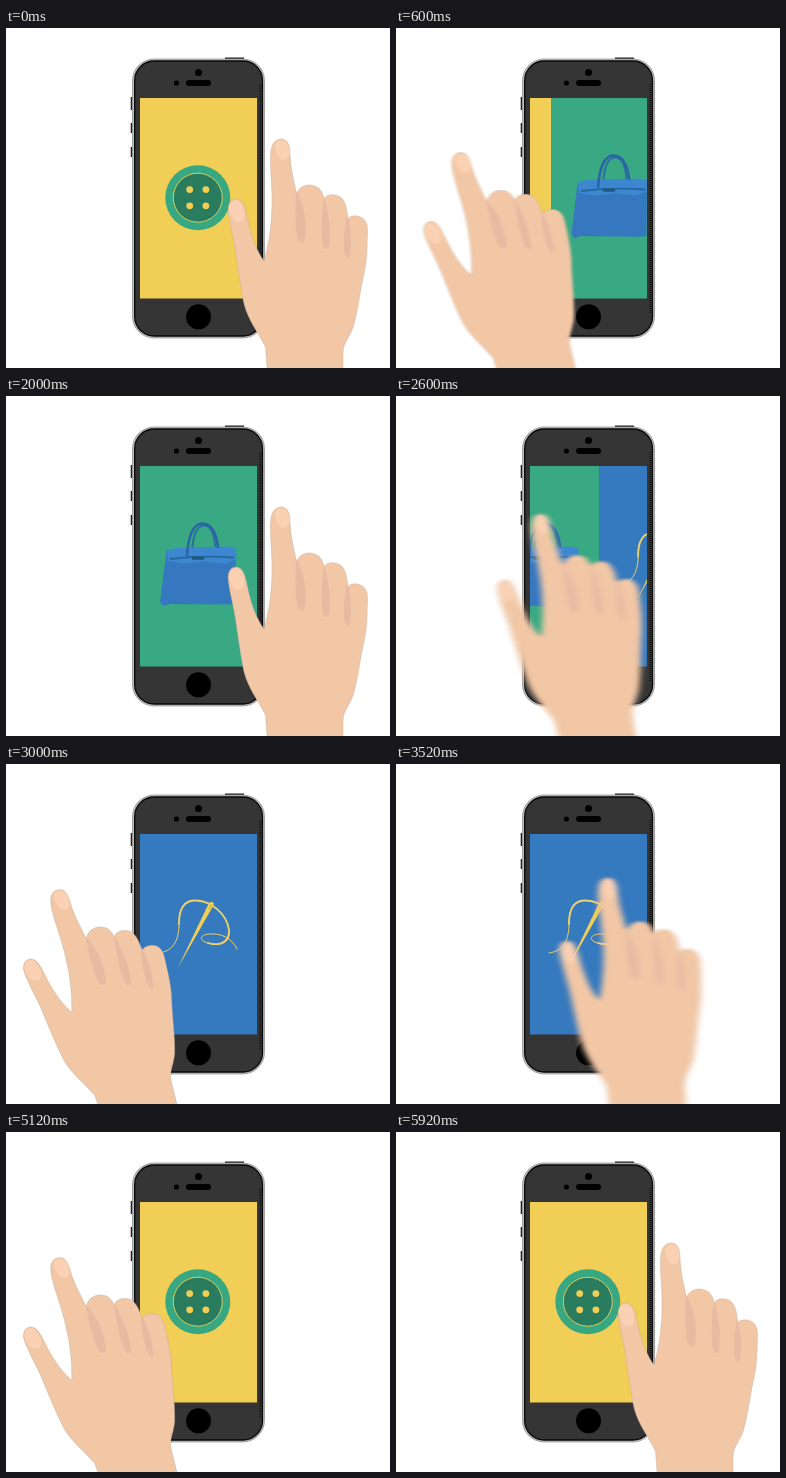
These frames come from a looping animation (384x340 px, 5960 ms). An HTML page:

```html
<!DOCTYPE html>
<html lang="en">
<head>
<meta charset="utf-8">
<title>Swipe</title>
<style>
html, body { margin: 0; width: 100%; height: 100%; overflow: hidden; background: #fff; }
svg { display: block; width: 384px; height: 340px; }
</style>
</head>
<body>
<svg viewBox="0 0 384 340" xmlns="http://www.w3.org/2000/svg">
  <defs>
    <clipPath id="screen"><rect x="134" y="70" width="117" height="200.5"/></clipPath>
    <filter id="blur" filterUnits="userSpaceOnUse" x="-30" y="0" width="450" height="420" color-interpolation-filters="sRGB">
      <feGaussianBlur id="blurAmount" stdDeviation="0 0"/>
    </filter>
  </defs>

  <!-- phone -->
  <g>
    <path d="M219 30.2H238M125.5 69V82M125.5 95V105M125.5 119V129" stroke="#222" stroke-width="1.6" fill="none"/>
    <rect x="126.5" y="31" width="132" height="279" rx="21.5" fill="#bcbcbc" stroke="#8c8c8c" stroke-width=".7"/>
    <rect x="128.7" y="33" width="127.8" height="275" rx="19.5" fill="#353535" stroke="#080808" stroke-width="1.3"/>
    <path d="M254.3 56V286" stroke="#151515" stroke-width="2" stroke-dasharray="1 1"/>
    <circle cx="192.5" cy="44.5" r="3.5"/>
    <circle cx="170.5" cy="55" r="2.6"/>
    <rect x="180" y="52" width="25" height="6" rx="3"/>
    <circle cx="192.5" cy="288.8" r="12.5"/>
  </g>

  <!-- pages -->
  <g clip-path="url(#screen)">
    <g class="page">
      <rect x="134" y="70" width="117.5" height="201" fill="#f1ce56"/>
      <circle cx="191.8" cy="169.7" r="32.5" fill="#37a881"/>
      <circle cx="191.8" cy="169.7" r="24.5" fill="#2a7c5e" stroke="#d8cc62" stroke-width="1"/>
      <g fill="#f1ce56">
        <circle cx="183.7" cy="161.6" r="3.4"/><circle cx="199.9" cy="161.6" r="3.4"/>
        <circle cx="183.7" cy="177.8" r="3.4"/><circle cx="199.9" cy="177.8" r="3.4"/>
      </g>
    </g>
    <g class="page">
      <rect x="134" y="70" width="117.5" height="201" fill="#38a983"/>
      <path d="M186 156C187 140 191 129.500 198 129.500C206 129.500 209 141 209.500 154" fill="none" stroke="#2b6f9e" stroke-width="2"/>
      <path id="bag" fill="#3578c0"/>
      <path d="M161 154L170 152L222 150.500L230 152.500L230.500 163L219 167.500L198 165.500L177 167.500L162 165Z" fill="#3c87d0"/>
      <path d="M164 163Q196 159 228 161.500" fill="none" stroke="#24679f" stroke-width="1.8"/>
      <path d="M186 162H198" stroke="#205a80" stroke-width="3.5"/>
      <path d="M181 160C182 141 187 127.500 196.500 127.500C206 127.500 211 139 212 152" fill="none" stroke="#2a66a6" stroke-width="2.6"/>
    </g>
    <g class="page">
      <rect x="134" y="70" width="117.5" height="201" fill="#3579bf"/>
      <g fill="none" stroke="#edd069" stroke-linecap="round">
        <path d="M153 189C168 187 172 176 173 163C172 145 178 137 188 136.500C205 136 221 150 223 166C225 180 212 183 202 179C193 177 193 171 203 170C215 169 226 174 231 185" stroke-width="1"/>
        <path d="M173 160C173 145 178 137 188 136.500C205 136 221 150 223 166C224 179 212 182 202 179" stroke-width="1.8"/>
      </g>
      <path d="M171.500 204.500L202.500 140Q205 136 208 139.500L206 144Z" fill="#f1ce56"/>
      <path d="M205.500 140.500L203 145.500" stroke="#b9a95f" stroke-width="1"/>
    </g>
  </g>

  <g filter="url(#blur)">
    <g id="hand">
      <path d="M262 410L261 340L259.500 319C252 304 242 292 238 276C234 256 232 240 229 220C226 204 223 193 222 182C222 174 226 171 230 171C235 171 238 175 240 184C244 203 248 219 258 233C263 216 266 196 266 172C266 154 264 141 264.500 127C265 116 269 111 275 111C281 111 284 116 284 126C284.500 141 288 152 290.500 166C293 159 298 157 304 157C313 158 317 163 318 171C320 167 325 166 329 167C337 168 341 175 341.500 191C344 188 347 187.500 351 188C358 189 362 194 361.500 204C361 222 361 234 357 250C353 270 352 282 347.500 298C344 309 337 315 337 325L336.500 410Z" fill="#f2c7a5" stroke="#b9a598" stroke-opacity=".45" stroke-width=".8"/>
      <g fill="#e7baa2">
        <path d="M290.500 163C288.500 180 289 204 292 212Q295 217 299 212C301 196 300 182 290.500 163Z"/>
        <path d="M318 169C315.500 184 315 208 317 218Q320 224 323 219C325 201 323 186 318 169Z"/>
        <path d="M341.300 187C338 201 337 217 339 227Q342 233 344 227C345.500 211 345 199 341.300 187Z"/>
      </g>
      <g fill="#fbd1b3">
        <path d="M269 118Q271 112 276 112Q283 113 283.500 124Q283 132 277 132Q271 131 269 118Z"/>
        <path d="M223 180Q225 172 230 172Q236 173 238 184Q239 194 232 194Q225 193 223 180Z"/>
      </g>
    </g>
  </g>
</svg>
<script>
const LOOP = 5960, STEP = 40, WIDTH = 117;
const STARTS = [0, 2120, 4240];
const SWIPE = [258, 658], BACK = [1143, 1543], SLIDE = [290, 720];
const PIVOT = [298, 335], TRAVEL = -168, DROP = 2, TILT = -14.5;

const $ = id => document.getElementById(id);
const hand = $('hand'), blur = $('blurAmount'), bag = $('bag');
const pages = [...document.querySelectorAll('.page')];

function ease(t, [from, to]) {
  const p = Math.min(1, Math.max(0, (t - from) / (to - from)));
  return (1 - Math.cos(Math.PI * p)) / 2;
}

const reach = t => ease(t, SWIPE) - ease(t, BACK);

function drawHand(t) {
  const r = reach(t);
  const speed = Math.abs(reach(t + STEP / 2) - reach(t - STEP / 2)) * -TRAVEL;
  hand.setAttribute('transform',
    `translate(${TRAVEL * r} ${DROP * r}) rotate(${TILT * r} ${PIVOT})`);
  blur.setAttribute('stdDeviation', `${speed * 0.13} ${speed * 0.035}`);
}

function drawBag(time) {
  const s = Math.cos(Math.PI * (time - 1240) / 760);
  const left = 157 + 3 * s, right = 231.5 + 2.5 * s;
  bag.setAttribute('d', `M160.500 155L230 152.500L${right} ${207 - s}` +
    `L${right - 7} ${210 + 1.5 * s}L${left + 10} ${209 + s}` +
    `L${left + 3} ${209.500 - s * 0.5}L${left} ${207 + s}Z`);
}

function drawPages(index, t) {
  const p = ease(t, SLIDE), next = (index + 1) % pages.length;
  pages.forEach((page, i) => {
    const x = i === index ? -p * WIDTH : (1 - p) * WIDTH;
    const shown = i === index ? p < 1 : i === next && p > 0;
    page.setAttribute('visibility', shown ? 'visible' : 'hidden');
    page.setAttribute('transform', `translate(${x} 0)`);
  });
}

function draw(time) {
  const index = STARTS.filter(s => s <= time).length - 1;
  const t = time - STARTS[index];
  drawHand(t);
  drawBag(time);
  drawPages(index, t);
}

const begin = performance.now();
function tick() {
  const time = (performance.now() - begin) % LOOP;
  draw(Math.floor(time / STEP) * STEP);
  requestAnimationFrame(tick);
}
tick();
</script>
</body>
</html>
```
